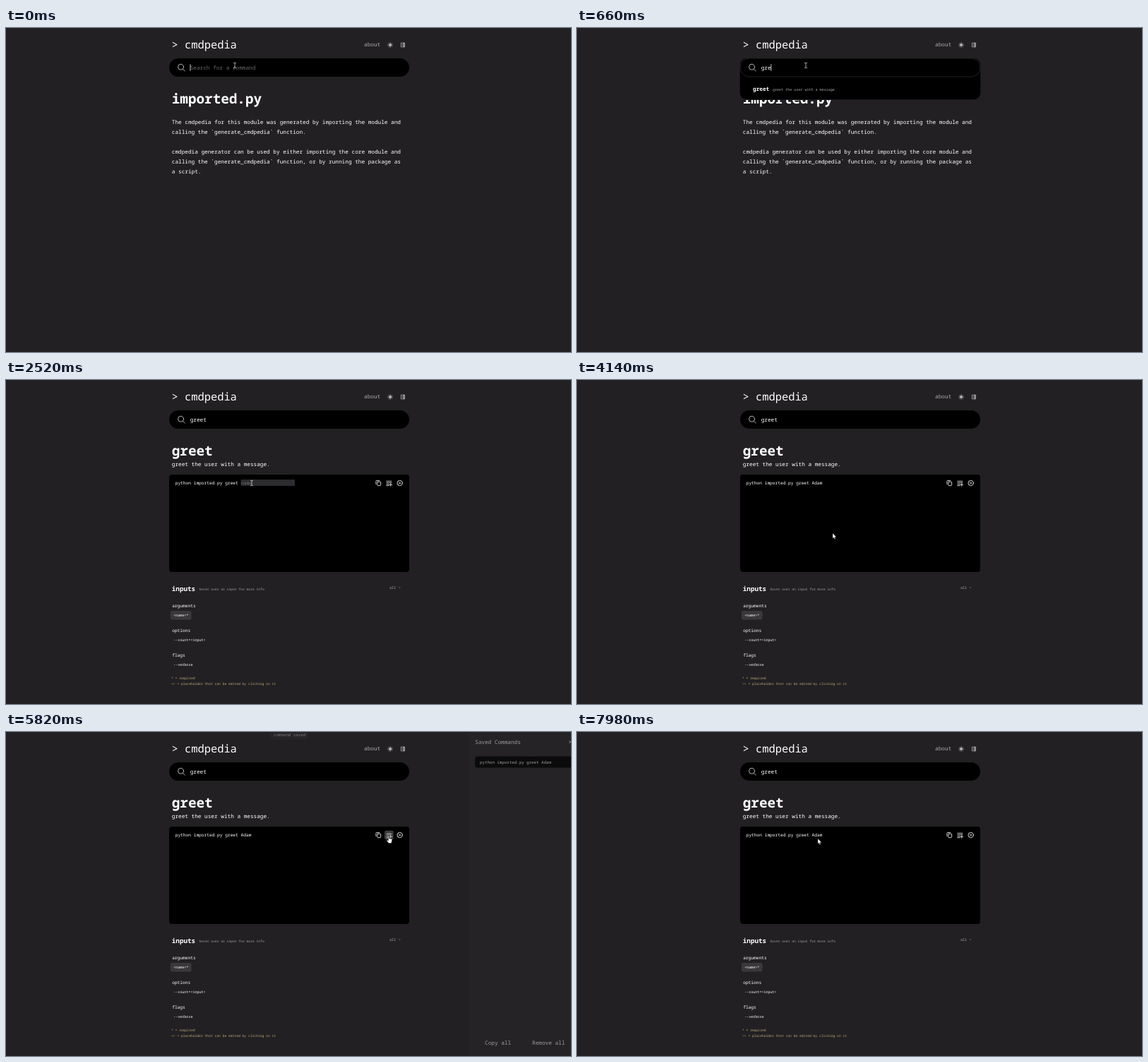
These frames come from a looping animation (800x459 px, 8 s). An HTML page:

```html
<!DOCTYPE html>
<html lang="en">
<head>
<meta charset="utf-8">
<title>cmdpedia</title>
<style>
  html, body { margin: 0; width: 100%; height: 100%; overflow: hidden; background: #222023; }
  svg { display: block; width: 100%; height: 100%; }
  text { font-family: "Noto Sans Mono", "DejaVu Sans Mono", monospace; white-space: pre; text-rendering: geometricPrecision; }
  .line { fill: none; stroke-linecap: round; stroke-linejoin: round; }
</style>
</head>
<body>
<svg id="stage" viewBox="0 0 800 459">
  <rect width="800" height="459" fill="#222023"/>
  <g id="header"></g>
  <g class="line" stroke="#b4b2b5" stroke-width=".8">
    <circle cx="544" cy="24" r="1.7" fill="#b4b2b5"/>
    <path d="M544 20.5v.9M544 26.6v.9M540.5 24h.9M546.6 24h.9M541.5 21.5l.6.6M545.9 25.9l.6.6M541.5 26.5l.6-.6M545.9 22.1l.6-.6"/>
    <path d="M559.7 21.2h4.8v5.6h-4.8zM562.7 21.2v5.6M563.7 21.2v5.6M560.6 24h1.4"/>
  </g>

  <g id="home"></g>

  <g id="command">
    <rect x="231" y="134" width="340" height="138" rx="4"/>
    <rect id="field" x="332.5" y="141" width="76.5" height="9" rx="1" fill="#2c2b2d"/>
    <rect x="233" y="327" width="29.5" height="12.5" rx="2" fill="#3a383b"/>
    <rect id="hover" y="140.5" width="11" height="11" rx="1" fill="#1c1c1c" stroke="#8a8a8a" stroke-width=".7"/>
    <g class="line" stroke="#e4e4e4" stroke-width=".9">
      <rect x="525.8" y="144.2" width="4.8" height="5.4" rx=".8"/>
      <path d="M523.9 147.6v-4.3q0-.9.9-.9h4"/>
      <path d="M538.8 143.4h7M538.8 145.6h7M538.8 147.8h3.4M538.8 149.6h3.4M544.7 146.6v3.6M542.9 148.4h3.6"/>
      <circle cx="557.6" cy="146" r="3.7"/>
      <path d="M556.2 144.6l2.8 2.8M559 144.6l-2.8 2.8"/>
      <path d="M556 293.7l1.1.8 1.1-.8" stroke="#8f8d90" stroke-width=".6"/>
    </g>
  </g>

  <g id="dropdown">
    <rect x="230" y="45" width="342" height="57" rx="10" fill="#19171a"/>
    <rect x="231" y="43" width="340" height="58" rx="9"/>
  </g>
  <rect id="pill" x="231" y="43" width="340" height="26" rx="13"/>
  <g class="line" stroke="#c8c8c8" stroke-width=".9">
    <circle cx="247.5" cy="55.2" r="4"/><path d="M250.4 58.2l2.9 2.8"/>
  </g>
  <g id="search"></g>
  <rect id="caret" width=".9" fill="#ddd"/>

  <g id="toast">
    <rect x="374" y="8" width="54" height="13" rx="3" fill="#2d2b2e"/>
  </g>
  <g id="panel">
    <rect x="640" width="162" height="459" fill="#272528"/>
    <rect x="649" y="34.5" width="142" height="16" rx="4"/>
    <path class="line" d="M782.5 12.5l3.4 3.4M785.9 12.5l-3.4 3.4" stroke="#ddd" stroke-width=".8"/>
  </g>

  <g id="pointers" stroke-linejoin="round">
    <path id="arrow" d="M0 0V7.4L1.7 5.9 2.9 8.4 4.1 7.9 3 5.4H5.3Z" fill="#fff" stroke="#111" stroke-width=".4"/>
    <path id="beam" class="line" d="M-1.6-3.8Q0-3.8 0-3V3Q0 3.8-1.6 3.8M1.6-3.8Q0-3.8 0-3M0 3Q0 3.8 1.6 3.8" stroke="#c9c9c9" stroke-width=".8"/>
    <path id="hand" d="M-.7.6Q0-.4.7.6V3.8L4 4.6Q4.8 4.9 4.7 5.8L4 9.2 3.4 10.6H-.3L-3 6.8Q-2.8 5.5-1.6 6.2L-.7 7Z" fill="#fff" stroke="#222" stroke-width=".5"/>
  </g>
</svg>
<script>
const LOOP = 8000, STEP = 60;
const NAME = 'Adam';
const SIZE = { logo: 15.4, title: 19.3, section: 9.25, body: 7.73, code: 6.2, saved: 5.8, small: 5.06, hint: 4.68 };
const $ = id => document.getElementById(id);

function label(parent, x, y, size, content, fill = '#fff', weight = 500) {
  const node = document.createElementNS('http://www.w3.org/2000/svg', 'text');
  const attributes = { x, y, 'font-size': SIZE[size], fill, 'font-weight': weight };
  for (const key in attributes) node.setAttribute(key, attributes[key]);
  node.textContent = content;
  $(parent).append(node);
  return node;
}

label('header', 234.5, 28.8, 'logo', '> cmdpedia', '#fff', 400);
label('header', 507, 26.4, 'body', 'about', '#aaa8ab', 400);

label('home', 234.8, 106.6, 'title', 'imported.py', '#fff', 700);
[
  [136, 'The cmdpedia for this module was generated by importing the module and'],
  [150, 'calling the `generate_cmdpedia` function.'],
  [178, 'cmdpedia generator can be used by either importing the core module and'],
  [192, 'calling the `generate_cmdpedia` function, or by running the package as'],
  [206, 'a script.']
].forEach(([y, line]) => label('home', 234.8, y, 'body', line));

label('command', 234.8, 106.6, 'title', 'greet', '#fff', 700);
label('command', 234.8, 122, 'body', 'greet the user with a message.');
const code = label('command', 239.7, 148, 'code', '');
const fieldText = label('command', 333, 148, 'code', '');
label('command', 234.8, 299, 'section', 'inputs', '#fff', 700);
label('command', 273.5, 298.3, 'hint', 'hover over an input for more info', '#a3a1a4', 400);
label('command', 543, 295.6, 'small', 'all', '#aaa8ab', 400);
[[322.4, 'arguments'], [357, 'options'], [391.6, 'flags']]
  .forEach(([y, heading]) => label('command', 235.2, y, 'code', heading));
[[335.4, '<name>*'], [370, '--count=<input>'], [404.6, '--verbose']]
  .forEach(([y, input]) => label('command', 237.2, y, 'small', input));
label('command', 234, 423.8, 'hint', '* = required', '#b9ab7c', 400);
label('command', 234, 432.2, 'hint', '<> = placeholder that can be edited by clicking on it', '#b9ab7c', 400);

label('dropdown', 249, 89.4, 'body', 'greet', '#fff', 600);
label('dropdown', 277, 89.2, 'small', 'greet the user with a message.', '#aaa', 400);
const query = label('search', 260.7, 59, 'body', '');

const toastText = label('toast', 379, 16.5, 'saved', '', '#c8c6c9', 400);
label('panel', 649, 17, 'body', 'Saved Commands', '#ddd');
label('panel', 656, 44.8, 'saved', `python imported.py greet ${NAME}`, '#ddd', 400);
label('panel', 663, 443, 'body', 'Copy all', '#ddd');
label('panel', 730, 443, 'body', 'Remove all', '#ddd');

// Rows are [time, ...values].
const POINTER = [
  [0, 324, 53], [840, 324, 53], [1020, 312, 83], [1380, 312, 83], [1800, 346, 144],
  [2100, 348, 146], [3480, 348, 146], [3840, 362, 217], [4320, 362, 217], [4740, 527, 147],
  [5220, 527, 147], [5460, 542, 147], [6480, 542, 147], [6960, 370, 215], [7260, 333, 239],
  [7680, 341, 151], [8000, 341, 151]
];
const PANEL = [
  [0, 160, 0], [5640, 160, 0], [5700, 104, .15], [5760, 48, .4], [5820, 15, .65], [5880, 0, 1],
  [7620, 0, 1], [7680, 20, .75], [7740, 60, .45], [7800, 115, .15], [7860, 160, 0], [8000, 160, 0]
];
const TOAST = [
  [0, -24, 0], [4920, -24, 0], [5100, 0, 1], [5460, 0, 1], [5640, -24, 0],
  [5700, -24, 0], [5820, -10.5, .5], [5940, 0, 1], [6480, 0, 1], [6660, -24, 0], [8000, -24, 0]
];
const QUERY_KEYS = [360, 480, 600, 780, 900];
const NAME_KEYS = [2760, 2880, 3000, 3120];

const within = (t, from, to) => t >= from && t < to;
const typed = (word, keys, t) => word.slice(0, keys.filter(k => k <= t).length);
const show = (id, on) => $(id).setAttribute('visibility', on ? 'visible' : 'hidden');
const move = (id, x, y) => $(id).setAttribute('transform', `translate(${x} ${y})`);

function sample(rows, t, ease = u => u) {
  const next = Math.max(1, rows.findIndex(row => row[0] > t));
  const a = rows[next - 1], b = rows[next];
  const u = ease((t - a[0]) / (b[0] - a[0]));
  return a.slice(1).map((v, i) => v + (b[i + 1] - v) * u);
}

function render(t) {
  const opened = t >= 1140;
  const editing = within(t, 2100, 3900);
  const search = typed('greet', QUERY_KEYS, t);
  const name = typed(NAME, NAME_KEYS, t);

  show('home', !opened);
  show('command', opened);
  show('dropdown', search && !opened);
  $('pill').setAttribute('stroke', search && !opened ? '#202020' : 'none');
  query.textContent = opened ? 'greet' : search || 'Search for a command';
  query.setAttribute('fill', search ? '#fff' : '#69676a');

  const done = t >= 3900;
  code.textContent = 'python imported.py greet ' + (done ? NAME : editing ? '' : '<name>');
  fieldText.textContent = editing ? name || 'name' : '';
  fieldText.setAttribute('fill', name ? '#fff' : '#6c6a6d');
  show('field', editing);

  const caret = $('caret');
  const inField = editing && name;
  caret.setAttribute('x', inField ? 333 + name.length * 3.72 : 260.5 + search.length * 4.64);
  caret.setAttribute('y', inField ? 142 : 51.3);
  caret.setAttribute('height', inField ? 7 : 9.5);
  show('caret', !opened || inField);

  const smooth = u => u * u * (3 - 2 * u);
  const [x, y] = sample(POINTER, t, smooth);
  const beam = t < 900 || within(t, 2100, 3600);
  const hand = within(t, 4680, 6540);
  show('beam', beam);
  show('hand', hand);
  show('arrow', !beam && !hand);
  move('pointers', x, y);
  show('hover', hand);
  $('hover').setAttribute('x', t < 5340 ? 521.5 : 536.8);

  const [slide, panelAlpha] = sample(PANEL, t);
  move('panel', slide, 0);
  $('panel').setAttribute('opacity', panelAlpha);

  const [drop, toastAlpha] = sample(TOAST, t);
  toastText.textContent = t < 5670 ? 'command copied' : 'command saved';
  move('toast', 0, drop);
  $('toast').setAttribute('opacity', toastAlpha);
}

const start = performance.now();
function tick(now) {
  const t = Math.max(0, now - start) % LOOP;
  render(Math.floor(t / STEP) * STEP);
  requestAnimationFrame(tick);
}
render(0);
requestAnimationFrame(tick);
</script>
</body>
</html>
```
